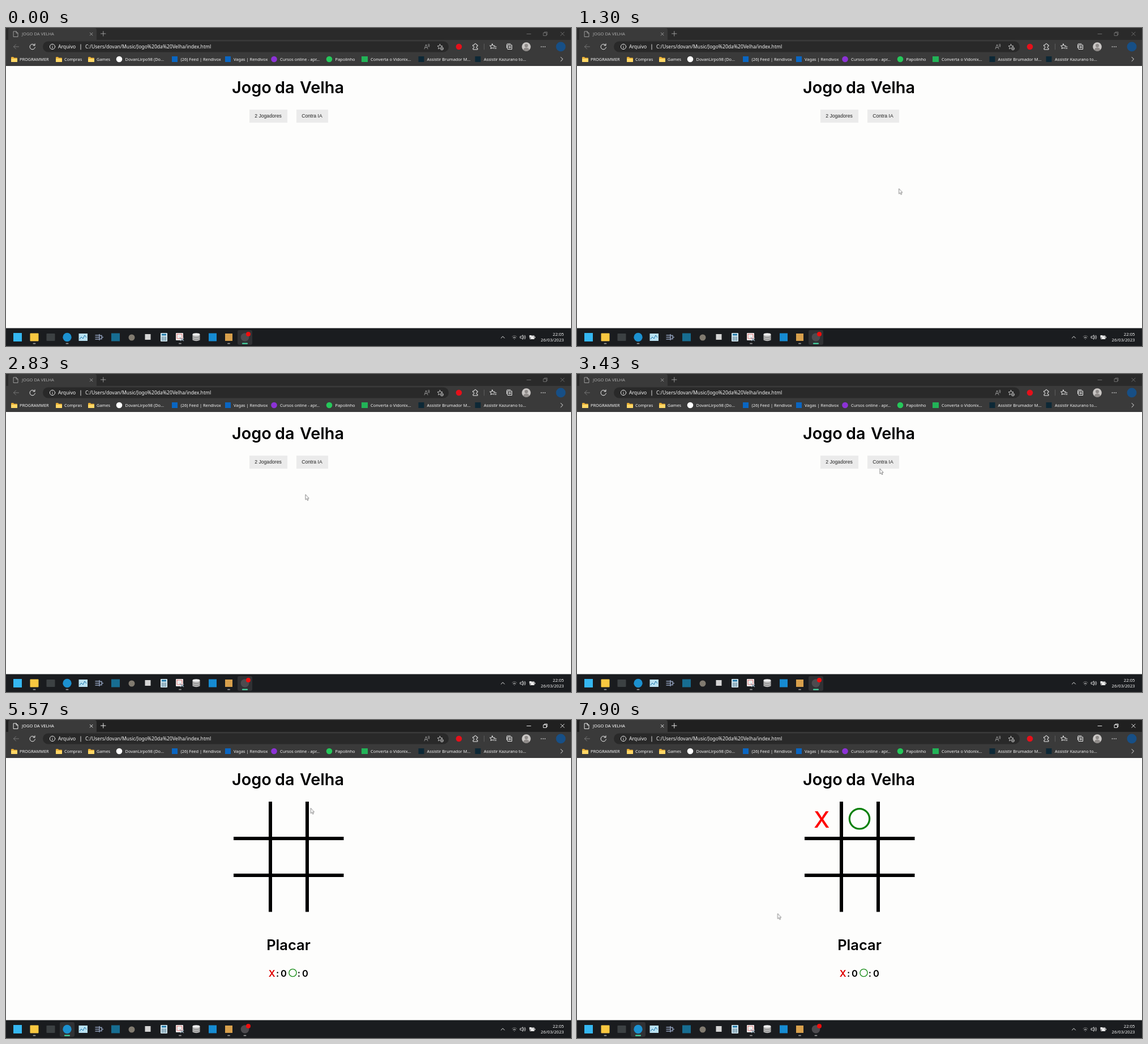
Write an HTML page that moves like this. It is 998 px wide and 561 px high and loops after 8 s.

```html
<!DOCTYPE html>
<html lang="pt-BR">
<head>
<meta charset="utf-8">
<title>Jogo da Velha</title>
<style>
  html, body { margin: 0; width: 100%; height: 100%; overflow: hidden; background: #fdfdfc; }
  svg { display: block; width: 998px; height: 561px; }
  text { white-space: pre; }
  .ui { font: 7.4px "Noto Sans", sans-serif; fill: #f4f4f4; }
  .url { font-size: 8.6px; }
  .clock { font-size: 7.7px; text-anchor: end; }
  .btn { font: 8.67px "Liberation Sans", sans-serif; fill: #222; text-anchor: middle; }
  .head { font: 600 28.8px Inter, sans-serif; text-anchor: middle; }
  .sub { font-size: 25.5px; }
  .score { font-size: 16.5px; }
  .mark { font: 500 40px Inter, sans-serif; text-anchor: middle; fill: #f00; }
  .line { fill: none; stroke: #eee; stroke-linecap: round; stroke-linejoin: round; }
  .dim { stroke: #999; }

  .chrome, .controls, .bar, .idle, .live, .menu, .game, .x, .o { animation: 8s step-end infinite; }
  .bar { animation-name: bar; }
  .chrome { animation-name: tint; }
  .controls { animation-name: controls; }
  .idle, .live { animation-name: focus; }
  .menu, .game { animation-name: board; }
  .x { animation-name: cross; }
  .o { animation-name: ring; }
  .idle, .menu { --a: 1; --b: 0; }
  .live, .game, .x, .o { --a: 0; --b: 1; }
  @keyframes bar { 0% { fill: #2a2a2a } 52.125%, 100% { fill: #202020 } }
  @keyframes tint { 0% { color: #a8a8a8 } 52.125%, 100% { color: #fff } }
  @keyframes controls { 0% { stroke: #747474 } 52.125%, 100% { stroke: #fff } }
  @keyframes focus { 0% { opacity: var(--a) } 52.125%, 100% { opacity: var(--b) } }
  @keyframes board { 0% { opacity: var(--a) } 54.625%, 100% { opacity: var(--b) } }
  @keyframes cross { 0% { opacity: var(--a) } 81.25%, 100% { opacity: var(--b) } }
  @keyframes ring { 0% { opacity: var(--a) } 83.75%, 100% { opacity: var(--b) } }

  .cursor { animation: move 8s linear infinite; }
  @keyframes move {
    0%, 7.9% { transform: translate(1008px, 381px) }
    8.375% { transform: translate(996px, 378px) }
    12.4% { transform: translate(632px, 302px); animation-timing-function: ease-out }
    22%, 29% { transform: translate(521.5px, 269.5px); animation-timing-function: ease-in-out }
    41%, 44% { transform: translate(535px, 167px); animation-timing-function: ease-in-out }
    50%, 56% { transform: translate(539.5px, 155px) }
    60%, 70% { transform: translate(538.3px, 155.5px); animation-timing-function: ease-in-out }
    79%, 84% { transform: translate(433px, 178px); animation-timing-function: ease-in-out }
    97%, 100% { transform: translate(354.5px, 341.5px) }
  }
</style>
</head>
<body>
<svg viewBox="0 0 998 561">
  <defs>
    <g id="folder">
      <path d="M0 1.2Q0 0 1.2 0H4L5.3 1.5H10Q11 1.5 11 2.5V9H0Z" fill="#e9ae34"/>
      <path d="M0 3H10Q11 3 11 4V8Q11 9 10 9H1Q0 9 0 8Z" fill="#ffd766"/>
    </g>
    <path id="star" d="M0-4.5L1.3-1.5L4.5-1.2L2.1 .9L2.8 4L0 2.4L-2.8 4L-2.1 .9L-4.5-1.2L-1.3-1.5Z"/>
  </defs>

  <!-- page -->
  <rect width="998" height="561" fill="#fdfdfc"/>
  <g class="head">
    <text x="434" y="115">Jogo</text>
    <text x="492.3" y="115">da</text>
    <text x="558" y="115">Velha</text>
  </g>
  <g class="menu">
    <path d="M430 144H497V167H430ZM513 144H569V167H513Z" fill="#ebebeb"/>
    <text class="btn" x="463" y="158.3">2 Jogadores</text>
    <text class="btn" x="540.5" y="158.3">Contra IA</text>
  </g>
  <g class="game">
    <path d="M467 144V338.5M532 144V338.5M402 209H596.5M402 274H596.5" stroke="#000" stroke-width="6"/>
    <text class="head sub" x="499" y="405.5">Placar</text>
    <g class="head score">
      <text x="469.7" y="453" fill="#e00000">X</text>
      <text x="479.6" y="453">:</text>
      <text x="490.5" y="453">0</text>
      <text x="517.5" y="453">:</text>
      <text x="528.5" y="453">0</text>
    </g>
    <circle cx="506.5" cy="446" r="6.6" fill="none" stroke="#128a12" stroke-width="1.3"/>
  </g>
  <text class="mark x" x="432.3" y="190">X</text>
  <circle class="o" cx="499" cy="174.3" r="17.7" fill="none" stroke="#0a800a" stroke-width="3.2"/>

  <!-- browser -->
  <rect class="bar" width="998" height="21"/>
  <path d="M0 21H4V4Q4 0 8 0H156Q160 0 160 4V21H998V67H0Z" fill="#3a3a3a"/>
  <rect x="65" y="23.5" width="717" height="19" rx="9.5" fill="#292929"/>
  <g class="chrome">
    <text class="ui" x="28" y="13" style="fill:currentColor;font-size:7.6px">JOGO DA VELHA</text>
    <g class="line" style="stroke:currentColor" stroke-width=".9">
      <path d="M13.5 6H18L21 9V15.5H13.5ZM18 6V9H21M148.3 8.3L153 13M153 8.3L148.3 13"/>
      <path d="M167.5 10H176M171.8 5.8V14.2"/>
    </g>
  </g>
  <path class="line controls" d="M920 10.5H927M949.5 8.5H954.5V13.5H949.5ZM951 8.3V7H956V12H954.7M979.8 7.2L986 13.4M986 7.2L979.8 13.4" stroke-width=".9"/>
  <g class="line">
    <path d="M22.5 33H13.5M17.5 29L13.5 33L17.5 37" stroke="#777"/>
    <path d="M50.5 30.3A4.7 4.7 0 1 0 51.4 34M51 27.8V30.8H48"/>
    <circle cx="82" cy="33" r="4.6"/>
    <path d="M82 32.7V35.5M82 30.8V30.9M132 29V38" stroke-width=".9"/>
    <path class="dim" d="M739 37L742 29L745 37M740 34.5H744M745.5 29Q747 30.5 745.8 32.5M747 28Q749 30.5 747.2 33.5" stroke-width=".9"/>
    <use href="#star" x="766.5" y="33" stroke="#bbb"/>
    <circle cx="770" cy="36.3" r="2.6" fill="#292929" stroke="#bbb"/>
    <path d="M768.8 36.3H771.2M770 35.1V37.5" stroke="#bbb" stroke-width=".8"/>
    <path d="M825 30H827Q827 27.5 829 27.5T831 30H833V32.3Q830.8 32.3 830.8 34T833 35.8V38H825V35.5Q827 35.5 827 33.8T825 32Z"/>
    <path d="M844.5 28V38" stroke="#666" stroke-width=".8"/>
    <use href="#star" x="859" y="32.5"/>
    <path d="M861.5 33.2H866M862.5 36H866" stroke="#3a3a3a" stroke-width="2.5"/>
    <path d="M862 33.2H866M863 36H866"/>
    <path d="M884.5 35V29.5Q884.5 28 886 28H891M886.5 30H893.5V37.5H886.5ZM890 31.8V35.7M888 33.7H892"/>
  </g>
  <circle cx="800" cy="33" r="5.3" fill="#e5101a"/>
  <circle cx="919" cy="33" r="7.8" fill="#c9c6c4"/>
  <path d="M913.5 38.7Q915 34.5 919 34.5T924.5 38.7Q919 43 913.5 38.7Z" fill="#8f8b89"/>
  <circle cx="919" cy="31" r="3" fill="#8f8b89"/>
  <path d="M945.5 33H952.5" stroke="#eee" stroke-width="1.7" stroke-linecap="round" stroke-dasharray="0 3.3"/>
  <circle cx="980" cy="33" r="8.5" fill="#174f86"/>
  <g class="ui url">
    <text x="92" y="36.2">Arquivo</text>
    <text x="140" y="36.2">C:/Users/dovan/Music/Jogo%20da%20Velha/index.html</text>
  </g>

  <!-- bookmarks -->
  <use href="#folder" x="9" y="51"/>
  <use href="#folder" x="88" y="51"/>
  <use href="#folder" x="145" y="51"/>
  <circle cx="200" cy="55" r="5.3" fill="#fff"/>
  <path d="M293 50H303V60H293ZM387 50H397V60H387Z" fill="#0a66c2"/>
  <circle cx="473.5" cy="55" r="5.3" fill="#8c32d6"/>
  <circle cx="571" cy="55" r="5.3" fill="#25c85a"/>
  <path d="M628 50H639V60H628Z" fill="#22b357"/>
  <path d="M728.5 50H738.5V60H728.5ZM828.5 50H838.5V60H828.5Z" fill="#0d2836"/>
  <g class="ui">
    <text x="24" y="58">PROGRAMMER</text>
    <text x="103" y="58">Compras</text>
    <text x="160" y="58">Games</text>
    <text x="210.5" y="58">DovanLirpo98 (Do...</text>
    <text x="308.5" y="58">(26) Feed | Rendivox</text>
    <text x="402" y="58">Vagas | Rendivox</text>
    <text x="484" y="58">Cursos online - apr...</text>
    <text x="581.5" y="58">Papolinho</text>
    <text x="644" y="58">Converta o Vidonix...</text>
    <text x="743.5" y="58">Assistir Brumador M...</text>
    <text x="844" y="58">Assistir Kazurano to...</text>
  </g>
  <path class="line" d="M980 51.5L983.5 55L980 58.5"/>

  <!-- taskbar -->
  <rect y="529.5" width="998" height="31.5" fill="#1a1c1f"/>
  <g class="idle">
    <rect x="409" y="533" width="26" height="26" rx="3" fill="#303134"/>
    <path d="M418 556.7H426" stroke="#45d6a2" stroke-width="2.2" stroke-linecap="round"/>
    <path d="M106.5 556.7H109.5" stroke="#999" stroke-width="1.8" stroke-linecap="round"/>
  </g>
  <g class="live">
    <rect x="95" y="533" width="26" height="26" rx="3" fill="#303134"/>
    <path d="M104 556.7H112" stroke="#45d6a2" stroke-width="2.2" stroke-linecap="round"/>
    <path d="M420.5 556.7H423.5" stroke="#999" stroke-width="1.8" stroke-linecap="round"/>
  </g>
  <path d="M48.5 556.7H51.5M306 556.7H309M392 556.7H395" stroke="#999" stroke-width="1.8" stroke-linecap="round"/>
  <rect x="13" y="538" width="15" height="15" fill="#35b7f1"/>
  <rect x="42.5" y="538.5" width="15" height="14" rx="1" fill="#f9c840"/>
  <rect x="71.5" y="539" width="15" height="13" rx="1" fill="#3c4143"/>
  <circle cx="108" cy="545.5" r="7.7" fill="#1c91d0"/>
  <rect x="128.5" y="539" width="15.5" height="13" fill="#b9e1f2"/>
  <path d="M130 549L133 545L136 548L139 542L142 546" fill="none" stroke="#1875a8"/>
  <path d="M157.5 542H165M157.5 545.5H165M157.5 549H165M165 540V551M165 542.5H169V548.5H165M169 545.5H172" fill="none" stroke="#8d9bb7" stroke-width="1.5"/>
  <rect x="186" y="538.5" width="15" height="14" fill="#176d91"/>
  <circle cx="222" cy="546" r="5.5" fill="#817b70"/>
  <rect x="245.5" y="540" width="10" height="10" fill="#d5d5d5"/>
  <rect x="273" y="538" width="12" height="15" rx="1" fill="#d4e8f1"/>
  <path d="M275 541H283" stroke="#2078a8" stroke-width="3"/>
  <path d="M275 545.5H283M275 548H283M275 550.5H283" stroke="#406b82" stroke-width="1.5" stroke-dasharray="2 1"/>
  <rect x="300" y="538" width="13" height="13" rx="1" fill="#eee"/>
  <path d="M302 540H311V548H302Z" fill="none" stroke="#d33" stroke-dasharray="1.5 1"/>
  <path d="M307 546L314 552M314 547L308 552" stroke="#8aa0b0" stroke-width="1.3"/>
  <path d="M329.5 540.5V550.5Q336 554 342.5 550.5V540.5Z" fill="#bbb"/>
  <ellipse cx="336" cy="540.5" rx="6.5" ry="2.3" fill="#eee"/>
  <path d="M329.5 544.5Q336 548 342.5 544.5M329.5 548Q336 551.5 342.5 548" fill="none" stroke="#777" stroke-width=".9"/>
  <rect x="358" y="538.5" width="14" height="14" fill="#168bd2"/>
  <rect x="387" y="539" width="13" height="13" fill="#d8a04c"/>
  <circle cx="422" cy="545.5" r="7.3" fill="#4d4b4f"/>
  <circle cx="428" cy="540" r="4" fill="#f20d0d"/>
  <g class="line">
    <path d="M874.5 547L877.5 544L880.5 547"/>
    <path d="M894 544.5Q898 541 902 544.5" stroke="#777"/>
    <path d="M895.8 546.5Q898 544.5 900.2 546.5M898 548.7V548.8"/>
    <path d="M908.5 544H910.5L913 541.7V549.3L910.5 547H908.5ZM914.8 543.8Q916 545.5 914.8 547.2M916.5 542.2Q919 545.5 916.5 548.8" stroke-width=".9"/>
    <path d="M926 543H933V548.5H926ZM934.5 545V546.5"/>
  </g>
  <path d="M927 543.5H932.5V548H927ZM924.5 542H928V546H924.5Z" fill="#eee"/>
  <g class="ui clock">
    <text x="985.5" y="543">22:05</text>
    <text x="985.5" y="553">26/03/2023</text>
  </g>

  <path class="cursor" d="M0 0V9.2L2.1 7.3L3.5 10.5L5 9.9L3.7 6.8H6.2Z" fill="#fff" stroke="#555" stroke-width=".7"/>
</svg>
</body>
</html>
```
